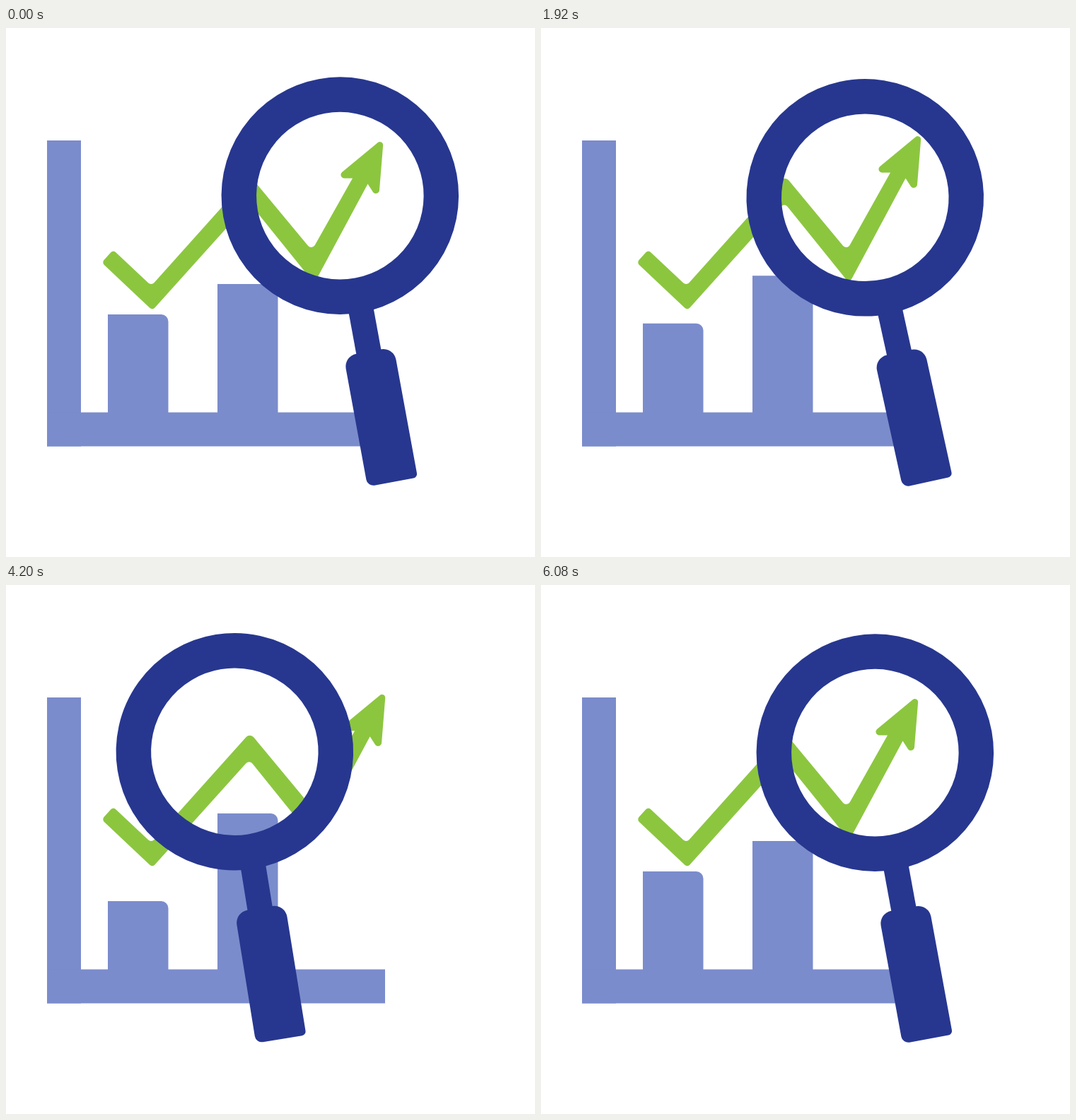
An HTML page with a canvas for the animation above (6.4 s loop, 748 px wide and 748 px high).

```html
<!DOCTYPE html>
<html lang="en">
<head>
<meta charset="utf-8">
<title>Chart under a magnifier</title>
<style>
  html, body { margin: 0; width: 100%; height: 100%; overflow: hidden; background: #fff; }
  canvas { display: block; width: 100vw; height: 100vh; object-fit: contain; }
</style>
</head>
<body>
<canvas id="stage" width="748" height="748"></canvas>
<script>
const ctx = document.getElementById('stage').getContext('2d');
const CYCLE = 3200, STEP = 40, MOVE = 280;
const LIGHT = '#7b8ccc', DARK = '#27378f', GREEN = '#8cc63f';

// Eased 0..1 move.
function move(t, start, duration = MOVE) {
  const u = Math.min(1, Math.max(0, (t - start) / duration));
  return (1 - Math.cos(Math.PI * u)) / 2;
}

// Critically damped 0..1 approach.
function settle(t, start, tau) {
  const x = Math.max(0, (t - start) / tau);
  return 1 - (1 + x) * Math.exp(-x);
}

// Out and back again.
const pulse = (t, out, back) => move(t, out) - move(t, back);

function box(x, y, w, h, radii = 0) {
  ctx.beginPath();
  ctx.roundRect(x, y, w, h, radii);
  ctx.fill();
}

// Closed polygon of [x, y, corner radius].
function roundedShape(points) {
  const [a, b] = [points[points.length - 1], points[0]];
  ctx.beginPath();
  ctx.moveTo((a[0] + b[0]) / 2, (a[1] + b[1]) / 2);
  points.forEach(([x, y, r], i) => {
    const next = points[(i + 1) % points.length];
    ctx.arcTo(x, y, next[0], next[1], r);
  });
  ctx.closePath();
  ctx.fill();
}

function drawChart(t) {
  ctx.fillStyle = LIGHT;
  box(58, 159, 48, 432.5);
  box(58, 543.5, 478, 48);
  const bar = (x, top) => box(x, top, 85.5, 545 - top, [0, 10, 0, 0]);
  const first = pulse(t, 160, 1360);
  bar(144, 405 + 42 * (first + pulse(t, 1816, 2520)));
  bar(299, 362 - 39 * (first + pulse(t, 1816, 2560)));
}

function drawArrow(t) {
  const k = pulse(t, 200, 840) + pulse(t, 1780, 2600);
  const head = (x, y, r) => [x + 8 * k, y - 16 * k, r];
  ctx.fillStyle = GREEN;
  roundedShape([
    [135.3, 331.7, 5], [151.5, 313.7, 5], [205.5, 364.5, 6], [345, 209, 7], [432.5, 314.5, 6],
    head(490, 212.5, 0), head(464.5, 212.5, 5), head(534, 155.3, 4.5), head(526.8, 244, 5),
    head(511.5, 220.5, 0),
    [436, 361, 5], [344, 247, 6], [207, 399.3, 5]
  ]);
}

// The foot slides; the lens trails behind it, swings past and settles.
function drawMagnifier(t) {
  const foot = 542.7 - 157.7 * (move(t, 0, 420) - move(t, 1468, 420));
  const lean = -10.4
    + 23 * (move(t, 0, 330) - settle(t, 440, 120))
    - 7 * move(t, 1500, 300) + 10 * move(t, 1800, 240) - 3 * move(t, 2040, 360);
  ctx.save();
  ctx.translate(foot, 642.7);
  ctx.rotate(lean * Math.PI / 180);
  ctx.translate(4, 0);
  ctx.fillStyle = ctx.strokeStyle = DARK;
  box(-36, -187.5, 72, 187.5, [18, 18, 6, 10]);
  box(-17.8, -255, 35.6, 75);
  ctx.lineWidth = 49.5;
  ctx.beginPath();
  ctx.arc(0, -411.6, 143, 0, 2 * Math.PI);
  ctx.stroke();
  ctx.restore();
}

function frame() {
  const t = Math.floor(performance.now() / STEP) * STEP % CYCLE;
  ctx.fillStyle = '#fff';
  ctx.fillRect(0, 0, 748, 748);
  drawChart(t);
  drawArrow(t);
  drawMagnifier(t);
  requestAnimationFrame(frame);
}
frame();
</script>
</body>
</html>
```
